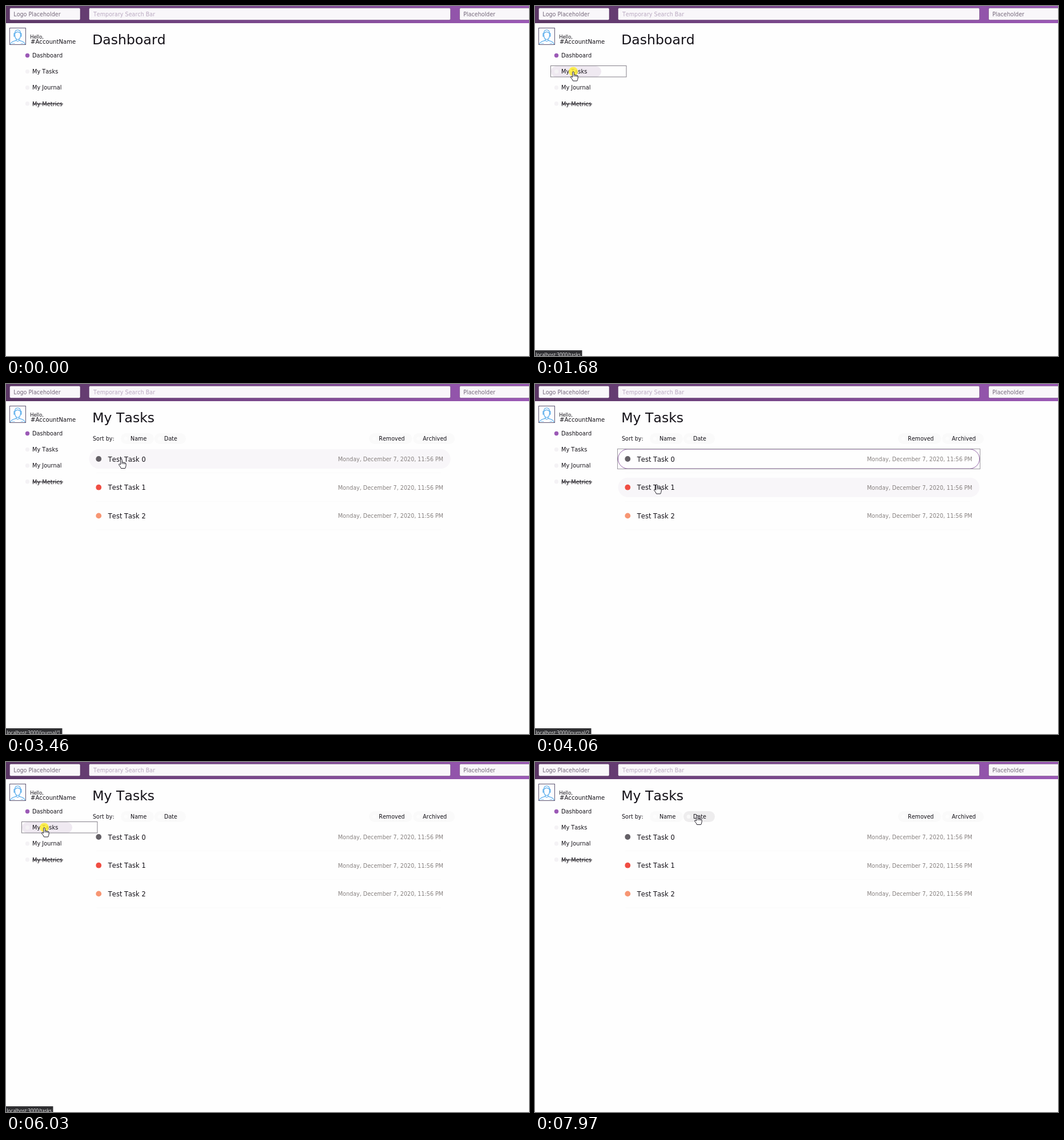
Recreate the animation shown at these times as an HTML page. Size 916 by 612 pixels, loop 8000 ms.

```html
<!DOCTYPE html>
<html lang="en">
<head>
<meta charset="utf-8">
<title>Task dashboard</title>
<style>
  html, body { margin: 0; width: 100%; height: 100%; overflow: hidden; background: #fefefe; }
  svg { display: block; width: 916px; height: 612px; }
  text { font: 9.6px "DejaVu Sans", Verdana, sans-serif; font-kerning: none; fill: #141118; white-space: pre; }
  .title { font-size: 23.6px; }
  .menu { font-size: 9.8px; }
  .task { font-size: 11.5px; }
  .date { fill: #86807f; }
  .field { fill: #75687b; }
  .status { font: 8.3px "Open Sans", "Noto Sans", sans-serif; fill: #f4f4f4; }
</style>
</head>
<body>
<svg viewBox="0 0 916 612" xmlns="http://www.w3.org/2000/svg">
  <defs>
    <linearGradient id="bar">
      <stop offset="0" stop-color="#5b3765"/><stop offset="1" stop-color="#9b59b6"/>
    </linearGradient>
    <radialGradient id="glow" gradientUnits="userSpaceOnUse" r="1" gradientTransform="translate(225 118) scale(560 30)" cx="0" cy="0">
      <stop offset="0" stop-color="#fff" stop-opacity=".85"/>
      <stop offset=".45" stop-color="#fff" stop-opacity=".6"/>
      <stop offset=".8" stop-color="#fff" stop-opacity=".15"/>
      <stop offset="1" stop-color="#fff" stop-opacity="0"/>
    </radialGradient>
    <mask id="fade" maskUnits="userSpaceOnUse" x="140" y="110" width="645" height="42">
      <rect x="140" y="110" width="645" height="42" fill="url(#glow)"/>
    </mask>
  </defs>
  <rect width="916" height="30" fill="url(#bar)"/>
  <g fill="#f9f7fa" stroke="#54305f" stroke-opacity=".45">
    <rect x="6.5" y="3.5" width="123.5" height="21" rx="2"/>
    <rect x="145.5" y="3.5" width="633" height="21" rx="2"/>
    <rect x="794.5" y="3.5" width="130" height="21" rx="2"/>
  </g>
  <text class="field" x="13.3" y="18">Logo Placeholder</text>
  <text x="153" y="18" style="fill:#b9a9c0">Temporary Search Bar</text>
  <text class="field" x="801" y="18">Placeholder</text>

  <rect x="6.5" y="38.5" width="28" height="29" fill="#fdfdff" stroke="#5e5672"/>
  <g fill="none" stroke="#4ba6ea" stroke-width="1.1">
    <path d="M15.3 48.5C15 39.5 26 39.5 25.7 48.5M14 48v5h1.5v-5zM25.5 48v5H27v-5zM15.5 51C16 61 25 61 25.5 51M16 47.5Q19 45 20.5 45.5Q22 45 25 47.5"/>
    <path d="M18 57.5V60C15 62 8.5 61 8 67M23 57.5V60C26 62 32.5 61 33 67M18 60Q20.5 63.5 23 60"/>
    <path d="M11 65.5h4M26 65.5h4" stroke-dasharray="1.5 1"/>
  </g>
  <text x="42.2" y="56.5" style="font-size:8.3px">Hello,</text>
  <text x="43" y="66" style="font-size:10.1px">#AccountName</text>

  <g id="menu"></g>
  <text id="title" class="title" x="151.2" y="67"></text>
  <g id="list"></g>
  <g id="ghost"><g mask="url(#fade)">
    <rect x="145.5" y="114" width="633" height="34" rx="17" fill="#fff" stroke="#9b59b6"/>
    <circle id="ghostDot" cx="162.3" cy="131" r="4.9"/>
    <text id="ghostName" class="task" x="178.8" y="135.7"></text>
    <text class="date" x="581.6" y="135">Monday, December 7, 2020, 11:56 PM</text>
  </g></g>
  <g id="status">
    <rect id="statusBox" y="602" height="10" fill="#303033"/>
    <text id="statusText" class="status" x="1.2" y="613"></text>
  </g>
  <g id="pointer">
    <circle id="press" r="8" fill="#ffee33" opacity=".85"/>
    <path id="arrow" d="M0 0V12.5L2.9 9.8L5 14.5L7 13.6L5 9.1H8.8Z" fill="#fff" stroke="#23202a" stroke-width=".9"/>
    <path id="hand" d="M-1.3 10V1.2Q0-.8 1.3 1.2V6Q2.6 5 3.9 6.4Q5.2 5.6 6.2 7Q8 6.5 8.2 8.5V11.5Q7.8 14 6.7 16.5H-.5Q-1.5 13.5-4.3 10.6Q-4.8 8.8-3 8.9ZM1.3 6v3M3.9 6.4v2.8M6.2 7v2.4" fill="#fff" stroke="#23202a"/>
    <path id="noDrop" d="M-6 0a6 6 0 1 0 12 0a6 6 0 1 0-12 0M-4.2-4.2L4.2 4.2" fill="none" stroke="#23210c" stroke-width="1.5"/>
  </g>
</svg>
<script>
const LOOP = 8000, PITCH = 49.7, ENTER = 490, OPEN = 1860, RECLICK = 6030;
const FIRST_DRAG = 3500, TURN = 620, HOLD = 350;
const colors = ['#646066', '#f04d42', '#f79673'];

const $ = id => document.getElementById(id);
const show = (el, on) => el.setAttribute('visibility', on ? 'visible' : 'hidden');
const clamp = (v, lo, hi) => Math.min(hi, Math.max(lo, v));

function add(parent, tag, attrs, text) {
  const el = document.createElementNS('http://www.w3.org/2000/svg', tag);
  for (const k in attrs) el.setAttribute(k, attrs[k]);
  if (text) el.textContent = text;
  return parent.appendChild(el);
}

// everything that reacts to the pointer
const targets = [];
function pill(parent, x, y, width, height, idle, hot, from, link) {
  const el = add(parent, 'rect', { x, y, width, height, rx: height / 2 });
  const item = { el, x, y, width, height, idle, hot, from, link };
  targets.push(item);
  return item;
}

['Dashboard', 'My Tasks', 'My Journal', 'My Metrics'].forEach((name, i) => {
  const y = 86.5 + i * 28.1, g = $('menu');
  pill(g, 28, y - 9.7, 88, 19.4, 'none', '#efe9f1', 0, name.slice(3).toLowerCase());
  add(g, 'circle', { cx: 37.5, cy: y, r: 3.7, fill: i ? '#f4f2f5' : '#9b59b6' });
  add(g, 'text', { class: 'menu', x: 46, y: y + 3.7 }, name);
  if (i === 3) add(g, 'path', { d: `M46.5 ${y + 0.4}h53.5`, stroke: '#141118' });
});
const outline = add($('menu'), 'rect', { x: 27.5, y: 104.5, width: 132.5, height: 19.5, fill: 'none', stroke: '#85818a' });

const list = $('list');
add(list, 'text', { x: 152, y: 99 }, 'Sort by:');
[['Name', 201, 58], ['Date', 260, 55], ['Removed', 636, 75], ['Archived', 713, 73]].forEach(([name, x, w]) => {
  pill(list, x, 86, w, 19, '#fafafa', '#eeedee', OPEN);
  add(list, 'circle', { cx: x + 9, cy: 95.5, r: 3.5, fill: '#fdfdfd', 'fill-opacity': 0.7 });
  add(list, 'text', { x: x + 17, y: 99 }, name);
});

const rows = colors.map((fill, i) => {
  const y = 131 + i * PITCH;
  add(list, 'path', { d: `M158 ${y + 24.5}H762`, stroke: '#fafafa' });
  const item = pill(list, 145.5, y - 17, 633, 34, 'none', '#f8f6f9', OPEN, 'journal/' + (i + 1));
  item.frame = add(list, 'rect', { x: 144.5, y: y - 17.5, width: 635, height: 35, fill: 'none' });
  add(list, 'circle', { cx: 162.3, cy: y, r: 4.9, fill });
  add(list, 'text', { class: 'task', x: 178.8, y: y + 4.7 }, 'Test Task ' + i);
  add(list, 'text', { class: 'date', x: 581.6, y: y + 4 }, 'Monday, December 7, 2020, 11:56 PM');
  return item;
});

// eased pointer moves: start, end, x, y
const grab = i => [202 + 11.5 * i, 131 + 48.5 * i];
const moves = [
  [ENTER, 1230, 67, 114.5],
  [OPEN, 2640, 53, 128], [2670, 2900, 75, 141], [2900, 3460, ...grab(0)]
];
colors.forEach((_, i) => {
  const [x, y] = grab(i), t = FIRST_DRAG + i * TURN;
  moves.push([t, t + 150, x + 9, y + 26]);
  if (i < 2) moves.push([t + 400, t + TURN, ...grab(i + 1)]);
});
moves.push([5230, 5710, 67, 114.5], [6230, 6900, 220, 132], [7040, 7830, 230, 93], [7870, 7970, 284, 93]);

function pointerAt(t) {
  let x = 857, y = 56;
  for (const [a, b, tx, ty] of moves) {
    const k = clamp((t - a) / (b - a), 0, 1), e = k * k * (3 - 2 * k);
    x += (tx - x) * e;
    y += (ty - y) * e;
  }
  return [x, y];
}

function dragAt(t) {
  const i = Math.floor((t - FIRST_DRAG) / TURN);
  return i >= 0 && i < 3 && (t - FIRST_DRAG) % TURN < HOLD ? i : -1;
}

function hoverAt(t) {
  if (t < ENTER) return;
  const drag = dragAt(t);
  if (drag >= 0) return rows[drag];
  const [x, y] = pointerAt(t);
  return targets.find(o => t >= o.from && x > o.x && x < o.x + o.width && y > o.y && y < o.y + o.height);
}

// the address lingers briefly after the pointer leaves a link
function linkAt(t) {
  for (let lag = 0; lag <= 400; lag += 20) {
    const item = hoverAt(t - lag);
    if (item && item.link) return item.link;
  }
  return '';
}

function render(t) {
  const [x, y] = pointerAt(t), hover = hoverAt(t), drag = dragAt(t), dragging = drag >= 0;
  const click = (t >= 1680 && t < OPEN) || (t >= RECLICK && t < RECLICK + 200);
  const focus = t < RECLICK ? Math.min(2, Math.floor((t - FIRST_DRAG) / TURN)) : -1;

  $('title').textContent = t < OPEN ? 'Dashboard' : 'My Tasks';
  show(list, t >= OPEN);
  show(outline, click);
  targets.forEach(o => o.el.setAttribute('fill', o === hover ? o.hot : o.idle));
  rows.forEach((r, i) => {
    r.el.setAttribute('stroke', focus === i ? '#9365a6' : 'none');
    r.frame.setAttribute('stroke', focus === i ? '#9b979f' : 'none');
  });

  show($('ghost'), dragging);
  if (dragging) {
    const [gx, gy] = grab(drag);
    $('ghost').setAttribute('transform', `translate(${x - gx} ${y - gy + drag * PITCH})`);
    $('ghostDot').setAttribute('fill', colors[drag]);
    $('ghostName').textContent = 'Test Task ' + drag;
  }

  const link = linkAt(t);
  show($('status'), link);
  $('status').setAttribute('opacity', clamp((t - 1310) / 170, 0, 1));
  $('statusText').textContent = 'localhost:3000/' + link;
  $('statusBox').setAttribute('width', 62.5 + 4 * link.length);

  $('pointer').setAttribute('transform', `translate(${x} ${y})`);
  show($('press'), click || dragging);
  show($('noDrop'), dragging);
  show($('hand'), hover && !dragging);
  show($('arrow'), t >= ENTER && !hover);
}

const start = performance.now();
function tick() {
  render((performance.now() - start) % LOOP);
  requestAnimationFrame(tick);
}
tick();
</script>
</body>
</html>
```
